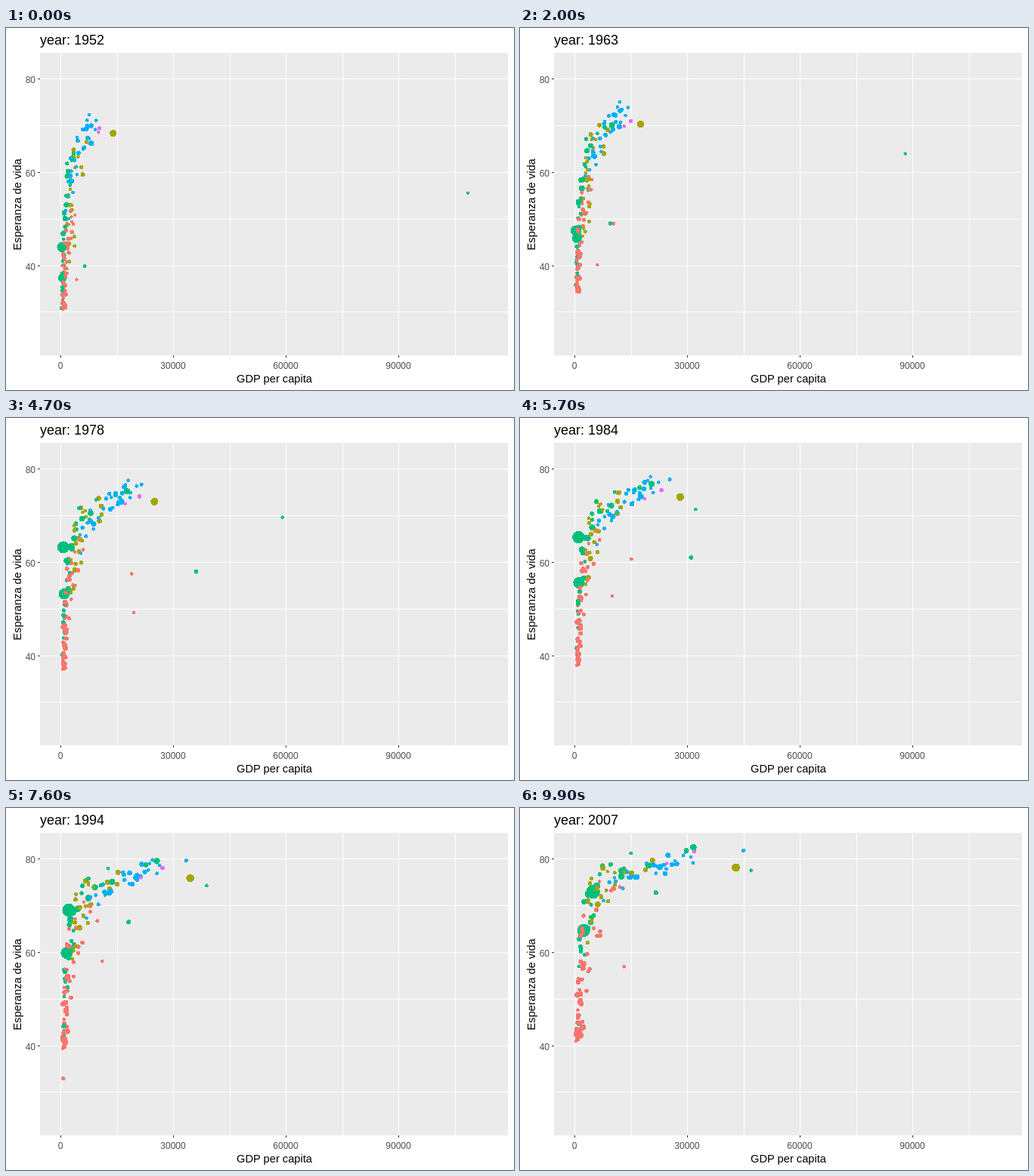
Animation of 672 by 480 pixels, one loop 10000 ms. Source, as an HTML page:

```html
<!DOCTYPE html>
<html lang="es">
<head>
<meta charset="utf-8">
<title>GDP per capita / Esperanza de vida</title>
<style>
  html, body { margin: 0; width: 100%; height: 100%; overflow: hidden; background: #fff; }
  svg { display: block; font-family: "Liberation Sans", Arial, sans-serif; }
  .tick { font-size: 12px; fill: #4d4d4d; }
  .name { font-size: 14.67px; text-anchor: middle; }
  .year { font-size: 18px; }
  path, rect, circle { shape-rendering: crispEdges; }
</style>
</head>
<body>
<svg width="672" height="480" viewBox="0 0 672 480">
  <rect x="45" y="33" width="619" height="401" fill="#ebebeb"/>
  <g id="axes"></g>
  <g id="dots"></g>
  <text class="name" x="355" y="470">GDP per capita</text>
  <text class="name" transform="translate(20 234) rotate(-90)">Esperanza de vida</text>
  <text class="year" id="year" x="45" y="22"></text>
</svg>
<script>
const FRAMES = 100, STEP = 100, FIRST = 1952, LAST = 2007;
const AFRICA = '#F8766D', AMERICAS = '#A3A500', ASIA = '#00BF7D', EUROPE = '#00B0F6', OCEANIA = '#E76BF3';
const $ = id => document.getElementById(id);

const px = gdp => 72.1 + gdp * 0.00497;
const py = life => 67.9 + (80 - life) * 6.18;
const radius = millions => 2.1 + 7.1 * Math.sqrt(millions / 1319);
const mix = (a, b, t) => a + (b - a) * t;
const clamp = v => Math.min(1, Math.max(0, v));

// Motion over t = 0..1: an eased change, and a straight-sided peak around a year
const ease = (from, to, power = 1) => t => mix(from, to, t ** power);
const peak = (year, height, years) => t =>
  height * Math.max(0, 1 - Math.abs(mix(FIRST, LAST, t) - year) / years);
const sum = (f, g) => t => f(t) + g(t);

function make(parent, tag, attrs) {
  const el = document.createElementNS('http://www.w3.org/2000/svg', tag);
  for (const k in attrs) el.setAttribute(k, attrs[k]);
  return parent.appendChild(el);
}

let seed = FIRST;
function rnd() {
  seed = (seed + 0x6D2B79F5) | 0;
  let n = Math.imul(seed ^ (seed >>> 15), 1 | seed);
  n = (n + Math.imul(n ^ (n >>> 7), 61 | n)) ^ n;
  return ((n ^ (n >>> 14)) >>> 0) / 4294967296;
}

function drawAxes() {
  const g = $('axes');
  const line = (d, stroke) => make(g, 'path', { d, stroke });
  const label = (x, y, anchor, text) =>
    make(g, 'text', { class: 'tick', x, y, 'text-anchor': anchor }).textContent = text;
  for (let gdp = 0; gdp <= 105000; gdp += 15000) {
    const x = Math.round(px(gdp)) + 0.5;
    line(`M${x} 33V434`, '#fff');
    if (gdp % 30000) continue;
    line(`M${x} 434v3`, '#333');
    label(x - 0.5, 452, 'middle', gdp);
  }
  for (let life = 30; life <= 80; life += 10) {
    const y = Math.floor(py(life)) + 0.5;
    line(`M45 ${y}H664`, '#fff');
    if (life % 20) continue;
    line(`M42 ${y}h3`, '#333');
    label(39, y + 5, 'end', life);
  }
}

const dots = [];
const add = (color, order, pop, gdp, life) => dots.push({ color, order, pop, gdp, life });

// Countries spread by rank between the low and high curves of their continent;
// weight says how much income follows rank rather than luck
function crowd(color, count, { pop, low, high, bend, poor, rich, weight, power }) {
  for (let i = 0; i < count; i++) {
    const u = (i + 0.5) / count, size = 100 ** (rnd() - 0.5);
    const rank = ease(u, clamp(u + 0.2 * (rnd() - 0.5)));
    const luck = ease(rnd(), rnd());
    const jitter = ease(2 * rnd() - 1, 2 * rnd() - 1);
    add(color, rnd(),
      t => pop(t) * size,
      t => poor(t) * (rich(t) / poor(t)) ** mix(luck(t), rank(t) ** power, weight),
      t => mix(low(t), high(t), rank(t) ** bend(t)) + jitter(t));
  }
}

crowd(AFRICA, 49, {
  pop: ease(2.5, 10), low: ease(31, 41, 0.7), high: ease(52, 75, 0.7), bend: ease(1.5, 1.8),
  poor: ease(350, 400), rich: ease(5500, 13000), weight: 0.5, power: 2
});
crowd(AMERICAS, 24, {
  pop: ease(3, 9), low: ease(39, 62, 0.85), high: ease(68, 79.5, 0.85), bend: ease(0.9, 0.6),
  poor: ease(1500, 2500), rich: ease(9000, 26000), weight: 0.5, power: 1.5
});
crowd(ASIA, 28, {
  pop: ease(7, 20), low: ease(30, 44, 0.7), high: ease(65, 81, 0.7), bend: ease(1.2, 0.5),
  poor: ease(350, 900, 2), rich: ease(4500, 36000), weight: 0.7, power: 1.5
});
crowd(EUROPE, 30, {
  pop: ease(7, 10), low: ease(44, 71.5, 0.75), high: ease(72, 81, 0.75), bend: ease(0.4, 0.5),
  poor: ease(1000, 6000), rich: ease(14000, 46000), weight: 0.7, power: 0.6
});
crowd(OCEANIA, 2, {
  pop: ease(4, 9), low: ease(69, 79.5, 1.3), high: ease(69.5, 82, 1.3), bend: ease(1, 1),
  poor: ease(10000, 22000), rich: ease(10500, 38000), weight: 1, power: 1
});

// Giants
add(ASIA, 0.2, ease(556, 1319), ease(400, 4959, 3.5), sum(ease(44, 73, 0.55), peak(1962, -11, 5)));
add(ASIA, 0.4, ease(372, 1110), ease(547, 2452, 2), ease(37.4, 64.7, 0.73));
add(AMERICAS, 0.9, ease(157, 301), ease(13990, 42952, 1.3), ease(68.4, 78.2));
add(ASIA, 0.5, ease(86, 127), ease(3217, 31656, 0.9), ease(63, 82.6, 0.63));

// Oil booms: the richest falls from its second peak and stays low
add(ASIA, 0.5, ease(0.2, 2.5),
  t => t < 0.36 ? ease(108400, 72000)(t) + peak(1972, 14000, 5)(t) : 0, ease(55.6, 77.6, 0.6));
dots.at(-1).gdp = t => mix(108400, 31000, clamp((t - 0.36) / 0.18))
  + peak(1967, -27500, 15)(t) * (t < 0.36) + 16000 * clamp((t - 0.54) / 0.46);
add(ASIA, 0.7, ease(4, 27.6), sum(ease(6460, 21655), peak(1979, 24000, 13.7)), ease(39.9, 72.8, 0.8));
add(AFRICA, 0.5, ease(1, 6), sum(ease(2387, 12057), peak(1974, 15500, 18)), ease(42.7, 74));
add(AFRICA, 0.3, ease(0.4, 1.4), sum(ease(4293, 13206), peak(1977, 13000, 7)),
  sum(ease(37, 52.5), peak(1992, 10, 27)));

// A sudden collapse and recovery
add(AFRICA, 0.7, ease(2.5, 8.8), ease(500, 850), sum(ease(40, 46), peak(1992, -21, 5)));

drawAxes();
dots.sort((a, b) => a.order - b.order);
for (const d of dots) d.el = make($('dots'), 'circle', { fill: d.color });

function draw(now) {
  const t = Math.floor(now / STEP) % FRAMES / (FRAMES - 1);
  $('year').textContent = 'year: ' + Math.round(mix(FIRST, LAST, t));
  for (const d of dots) {
    d.el.setAttribute('cx', px(d.gdp(t)).toFixed(2));
    d.el.setAttribute('cy', py(d.life(t)).toFixed(2));
    d.el.setAttribute('r', radius(d.pop(t)).toFixed(2));
  }
}

function loop() {
  draw(performance.now());
  requestAnimationFrame(loop);
}
loop();
</script>
</body>
</html>
```
